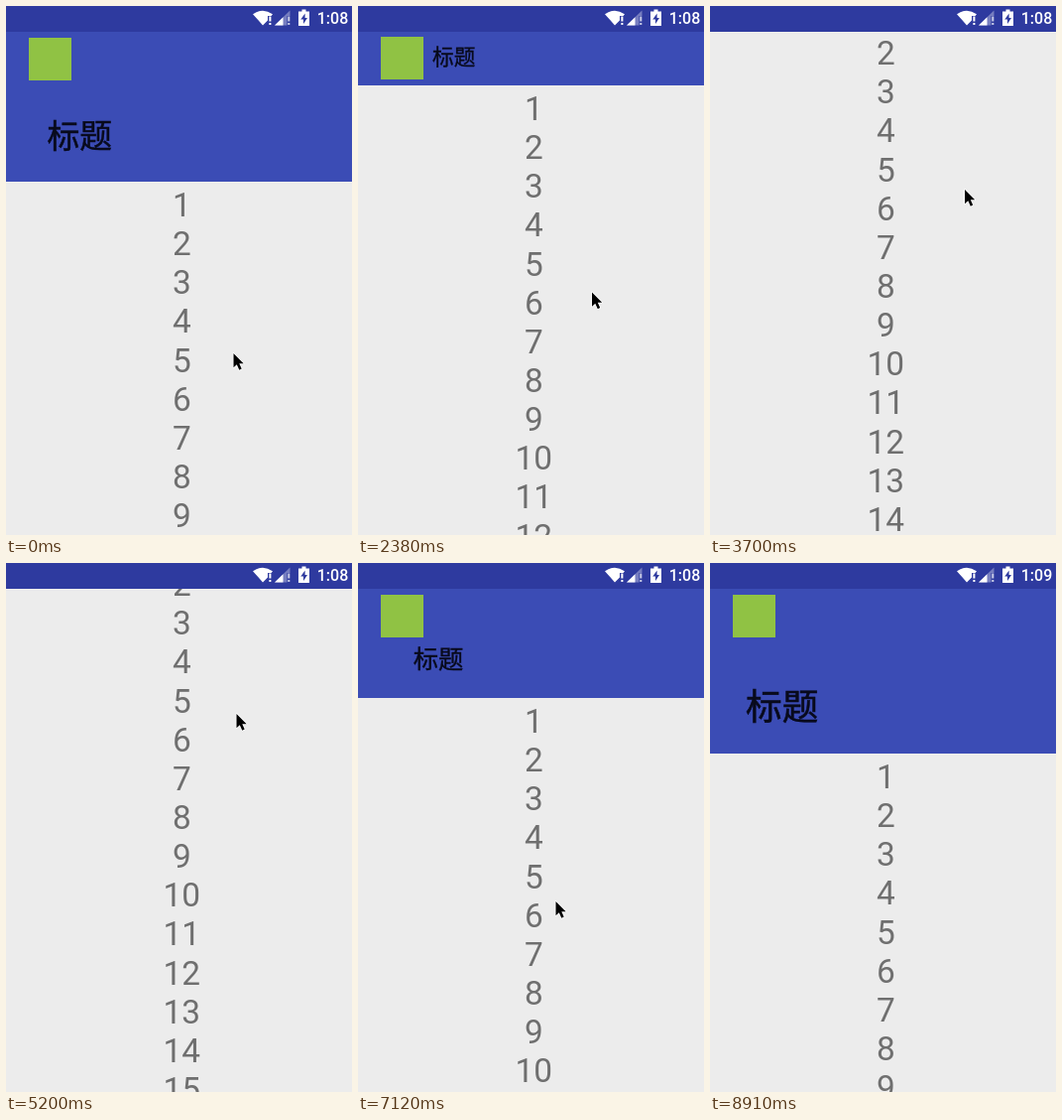
An HTML page that plays this animation: 349x533 px, repeating every 9210 ms.

```html
<!DOCTYPE html>
<html lang="zh">
<head>
<meta charset="utf-8">
<title>标题</title>
<style>
/* list position, cursor position, height of the re-entering bar */
@property --l { syntax: "<number>"; inherits: true; initial-value: 200; }
@property --x { syntax: "<number>"; inherits: true; initial-value: 229.5; }
@property --y { syntax: "<number>"; inherits: true; initial-value: 350; }
@property --e { syntax: "<number>"; inherits: true; initial-value: 26; }

html, body { margin: 0; width: 100%; height: 100%; overflow: hidden; background: #ececec; }
body { animation: drag 9210ms infinite; }

.stage {
  position: relative; width: 349px; height: 533px; overflow: hidden;
  font-family: Roboto, "Noto Sans", sans-serif;
  --h: max(26, var(--l) - 23.5, min(80.5, var(--e)));
  --f: clamp(0, (192 - var(--h)) / 111.5, 1);
  --off: min(0, var(--h) - 80.5);
}
.stage > *, .bar > * { position: absolute; }

.list {
  left: 0; top: 0; width: 354.6px; text-align: center;
  font-size: 33.4px; line-height: 39.14px; color: #6f6f6f;
  transform: translateY(calc((var(--l) - 19.1) * 1px));
}

.bar {
  left: 0; top: 0; width: 349px; height: calc(var(--h) * 1px);
  background: #3b4cb5;
  --over: clamp(0, (var(--h) - var(--l) + 23.5) / 10, 1);
  box-shadow: 0 1px 3px rgba(0, 0, 0, calc(.35 * var(--over) * clamp(0, var(--h) - 26, 1)));
}
.icon {
  left: 23px; top: calc((32 + var(--off)) * 1px);
  width: 43px; height: 43px; background: #90c244;
}
/* the size eases out while the position moves evenly */
.title {
  --s: calc(21.7 + 15 * (1 - var(--f)) * (1 - var(--f)));
  left: calc((36 + 39 * var(--f)) * 1px);
  top: calc((144 - 92 * var(--f) + var(--off)) * 1px - .556em);
  font: 500 calc(var(--s) * 1px)/1 "Noto Sans CJK SC", "Noto Sans CJK", sans-serif;
  -webkit-text-stroke: .015em #080a1c;
  color: #080a1c; white-space: nowrap;
}

.status { left: 0; top: 0; width: 349px; height: 26px; background: #2e3a9f; }
.status svg { position: absolute; left: 0; top: 0; }
.clock {
  position: absolute; left: 313.7px; top: 3px; color: #fff;
  font-size: 16px; font-weight: 500; line-height: 19px; white-space: nowrap;
}
.clock i { position: absolute; font-style: normal; animation: early 9210ms step-end infinite; }
.clock .late { animation-name: late; }

.cursor {
  left: -2px; top: -2px; overflow: visible;
  transform: translate(calc(var(--x) * 1px), calc(var(--y) * 1px));
}

@keyframes early { 0% { visibility: visible; } 91.75%, 100% { visibility: hidden; } }
@keyframes late { 0% { visibility: hidden; } 91.75%, 100% { visibility: visible; } }

@keyframes drag {
  0%, 3.149% { --l: 200; --x: 229.5; --y: 350; --e: 26; animation-timing-function: steps(4, start); }
  9.555%, 16.07% { --l: 200; --x: 188; --y: 387; --e: 26; animation-timing-function: steps(7, start); }
  27.36% { --l: 103; --x: 236; --y: 288.5; --e: 26; animation-timing-function: steps(9, start); }
  41.69% { --l: 8; --x: 257; --y: 185; --e: 26; animation-timing-function: steps(4, start); }
  48.21%, 51.47% { --l: -18; --x: 248; --y: 161; --e: 26; animation-timing-function: steps(1, start); }
  53.09%, 56.35% { --l: -18; --x: 231; --y: 145; --e: 26; animation-timing-function: steps(1, start); }
  57.98% { --l: -18; --x: 232.5; --y: 152; --e: 26; animation-timing-function: steps(7, start); }
  69.16% { --l: 58; --x: 219.5; --y: 234; --e: 102; animation-timing-function: steps(6, start); }
  78.83% { --l: 159; --x: 199.5; --y: 341; --e: 102; animation-timing-function: steps(7, start); }
  90.12%, 95.01% { --l: 215.5; --x: 190; --y: 398; --e: 102; animation-timing-function: steps(2, start); }
  98.26%, 100% { --l: 215.5; --x: 400; --y: 500; --e: 102; }
}
</style>
</head>
<body>
<div class="stage">
  <div class="list"></div>
  <div class="bar">
    <div class="icon"></div>
    <div class="title">标题</div>
  </div>
  <div class="status">
    <svg width="349" height="26" fill="#fff">
      <path d="M249 8.2Q259 1.2 269 8.2L267.6 10H264V14.5L259 19.5Z"/>
      <path d="M265.4 10.5h2v5h-2zM265.4 17h2v2h-2z"/>
      <path d="M271 19.5L286.5 4.5V10H283.5V19.5Z" opacity=".35"/>
      <path d="M271 19.5L279.5 11.3V19.5Z"/>
      <path d="M284.3 10.5h2v5h-2zM284.3 17h2v2h-2z" opacity=".75"/>
      <path d="M298.5 3.5h4v2h3.5v14.5h-11V5.500h3.500z"/>
      <path d="M301.600 7.500L297.300 13.500H300V18L304 12H301.600Z" fill="#2e3a9f"/>
    </svg>
    <div class="clock">1:0<i>8</i><i class="late">9</i></div>
  </div>
  <svg class="cursor" width="16" height="22" viewBox="-2 -2 16 22">
    <path d="M0 0V14.200L3.300 11.200L5.800 16.700L8.200 15.600L5.800 10.300H10.200Z"
      stroke="#fff" stroke-width="1.600" stroke-linejoin="round" paint-order="stroke"/>
  </svg>
</div>
<script>
const list = document.querySelector(".list");
for (let n = 1; n <= 20; n++) {
  const row = document.createElement("div");
  row.textContent = n;
  list.append(row);
}
</script>
</body>
</html>
```
